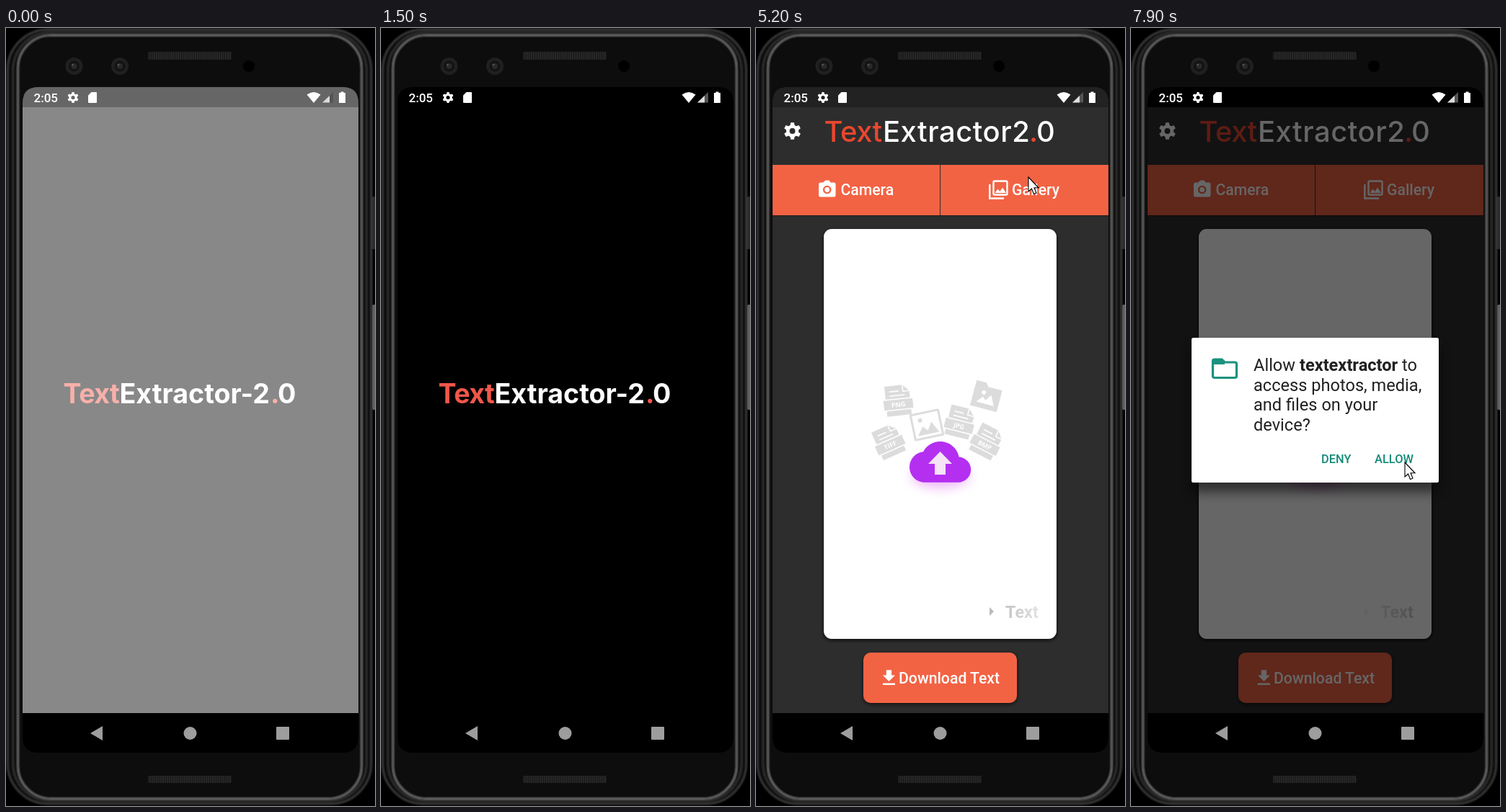
Animation, 512 px wide and 1080 px high, one loop 8 s. Source, as an HTML page:

```html
<!DOCTYPE html>
<html lang="en">
<head>
<meta charset="utf-8">
<title>Text extractor demo</title>
<style>
  html, body { margin: 0; width: 100%; height: 100%; overflow: hidden; background: #000; }
  svg { display: block; width: 100vw; height: 100vh; }
  text { font-family: Roboto, sans-serif; white-space: pre; }
  .title text { font: 500 40px Inter, sans-serif; letter-spacing: .5px; }
  .splash text { font: 700 37.6px Inter, sans-serif; }
  .title .red, .splash .red { letter-spacing: -.5px; }
  .label { font-size: 21.2px; font-weight: 500; fill: #fff; }
  .body { font-size: 23.6px; fill: #212121; }
  .action { font-size: 16.4px; font-weight: 500; fill: #138a77; }
  .tag { font: 700 9px "Open Sans", sans-serif; fill: #fff; text-anchor: middle; }
</style>
</head>
<body>
<svg viewBox="0 0 512 1080">
  <defs>
    <clipPath id="screen"><path d="M23 951V104Q23 82 45 82H467Q489 82 489 104V951Z"/></clipPath>
    <filter id="blur" x="-50%" y="-50%" width="200%" height="200%"><feGaussianBlur stdDeviation="8"/></filter>
    <filter id="soft" x="-10%" y="-10%" width="120%" height="120%"><feGaussianBlur stdDeviation="2"/></filter>
    <filter id="smooth" x="-5%" y="-5%" width="110%" height="110%"><feGaussianBlur stdDeviation=".8"/></filter>
    <pattern id="mesh" width="3" height="3" patternUnits="userSpaceOnUse">
      <rect width="3" height="3" fill="#262626"/><rect width="1" height="3" fill="#191919"/>
    </pattern>
    <linearGradient id="shimmer" gradientUnits="userSpaceOnUse" x1="-100" x2="100" y1="0" y2="0">
      <stop offset="0" stop-color="#bbb"/><stop offset=".5" stop-color="#fafafa"/><stop offset="1" stop-color="#bbb"/>
    </linearGradient>
    <g id="gear">
      <circle r="5.4" fill="none" stroke-width="4" stroke="#fff"/>
      <g id="teeth" fill="#fff"></g>
    </g>
  </defs>

  <g id="phone">
    <rect width="512" height="1080" fill="#000"/>
    <rect x="507" y="234" width="6" height="73" rx="2" fill="#2b2b2b"/>
    <rect x="508" y="384" width="6" height="146" rx="2" fill="#626262"/>
    <g filter="url(#smooth)">
      <rect x="2" y="2" width="505" height="1075" rx="56" fill="#101010" stroke="#3c3c3c" stroke-width="2.400"/>
      <rect x="10" y="6" width="490" height="1067" rx="52" fill="#060606" stroke="#2e2e2e" stroke-width="3"/>
      <rect x="16.500" y="10" width="477" height="1060" rx="46" fill="#080808" stroke="#747474" stroke-width="2.200"/>
    </g>
    <path d="M23 951H489V984Q489 1006 467 1006H45Q23 1006 23 984Z" fill="#000"/>
    <rect x="197" y="33" width="116" height="11" rx="2" fill="url(#mesh)"/>
    <rect x="197" y="1038" width="116" height="10" rx="2" fill="url(#mesh)"/>
    <g id="lenses"></g>
    <circle cx="337" cy="53" r="8" fill="#000"/>
    <g fill="#9d9d9d">
      <path d="M117 979L134 969V989Z"/><circle cx="255.500" cy="979" r="9"/>
      <rect x="375" y="970" width="18" height="18" rx="1"/>
    </g>
  </g>

  <g clip-path="url(#screen)">
    <g id="splash" class="splash">
      <rect x="23" y="82" width="466" height="869" fill="#000"/>
      <text class="red" x="79.500" y="521" fill="#f0574a">Text</text>
      <text x="157.500" y="521" fill="#fff">Extractor-2</text>
      <text x="367" y="521" fill="#f0574a">.</text>
      <text x="377" y="521" fill="#fff">0</text>
      <rect id="flash" x="23" y="110" width="466" height="841" fill="#fff"/>
      <rect id="flashBar" x="23" y="82" width="466" height="28" fill="#fff"/>
    </g>

    <g id="main">
      <rect x="23" y="82" width="466" height="869" fill="#2d2d2d"/>
      <use href="#gear" transform="translate(50.5 143) scale(1.17)"/>
      <g class="title">
        <text class="red" x="94.500" y="157.500" fill="#e9472f">Text</text>
        <text x="176" y="157.500" fill="#fff">Extractor2</text>
        <text x="379" y="157.500" fill="#e9472f">.</text>
        <text x="389" y="157.500" fill="#fff">0</text>
      </g>
      <path d="M23 190H255V260H23ZM256 190H489V260H256Z" fill="#f26344"/>
      <path d="M23 260.500H489" stroke="#1c1c1c"/>
      <path d="M94 213.500 96.500 211.500H101.500L103.500 214.500H108Q110.500 214.500 110.500 217V232Q110.500 234.500 108 234.500H89.500Q87 234.500 87 232V217Q87 214.500 89.500 214.500H93Z" fill="#fff"/>
      <circle cx="98.700" cy="224.500" r="4.600" fill="none" stroke="#f26344" stroke-width="2.400"/>
      <text class="label" x="117.500" y="232">Camera</text>
      <g fill="none" stroke="#fff" stroke-width="2.400">
        <rect x="329.500" y="212.500" width="19" height="19" rx="1.500"/>
        <path d="M324.300 217V236.500H344"/>
      </g>
      <path d="M331.500 229L335.500 223.500L338.500 227L342 221.500L347 229Z" fill="#fff"/>
      <text class="label" x="355" y="232">Gallery</text>

      <rect x="94" y="281" width="323" height="569" rx="11" fill="#111" filter="url(#soft)"/>
      <rect x="94" y="279" width="323" height="569" rx="11" fill="#fff"/>
      <g id="files" fill="#dcdcdc"></g>
      <g id="cloud">
        <ellipse cx="256" cy="622" rx="40" ry="16" fill="#e58bf0" opacity=".65" filter="url(#blur)"/>
        <path transform="translate(213 559.800) scale(3.55)" fill="#b52ff1"
          d="M19.350 10.040C18.670 6.590 15.640 4 12 4 9.110 4 6.600 5.640 5.350 8.040 2.340 8.360 0 10.910 0 14c0 3.310 2.690 6 6 6h13c2.760 0 5-2.240 5-5 0-2.640-2.050-4.780-4.650-4.960z"/>
        <path d="M255.500 588L272 605H263V620H248V605H239Z" fill="#f6e3f6"/>
      </g>
      <g fill="url(#shimmer)">
        <path d="M324 804L330 810L324 816Z"/>
        <text x="346" y="819" font-size="23.400" font-weight="700">Text</text>
      </g>

      <rect x="149" y="869" width="213" height="70" rx="10" fill="#161616" filter="url(#soft)"/>
      <rect x="149" y="867" width="213" height="70" rx="10" fill="#f26344"/>
      <path transform="translate(169.800 887.500) scale(1.22)" fill="#fff" d="M19 9h-4V3H9v6H5l7 7 7-7zM5 18v2h14v-2H5z"/>
      <text class="label" x="198" y="910">Download Text</text>
      <rect id="dim" x="23" y="82" width="466" height="869" fill="#000"/>
      <rect id="bar" x="23" y="82" width="466" height="28"/>
    </g>
  </g>

  <g id="status" fill="#fff">
    <text x="38.500" y="102.500" font-size="17" font-weight="500">2:05</text>
    <use href="#gear" transform="translate(93 96.5) scale(.76)"/>
    <path d="M118.500 89H125Q126 89 126 90V103Q126 104 125 104H115Q114 104 114 103V93.500Z"/>
    <path d="M427 104L417.500 92.500Q427 85.500 436.500 92.500Z"/>
    <path d="M454 89V103.500H439Z" fill="#555"/>
    <path d="M449 94V103.500H439Z" fill="#ddd"/>
    <path d="M464.500 88.500H468.500V90H471V104H462V90H464.500Z"/>
  </g>

  <g id="dialog">
    <rect x="84" y="442" width="343" height="202" rx="3" fill="#000" opacity=".55" filter="url(#blur)"/>
    <rect x="84" y="430" width="343" height="201" rx="2.500" fill="#fff"/>
    <path d="M116 460H126L130 464H144Q146.500 464 146.500 466.500V483Q146.500 485.500 144 485.500H116Q113.500 485.500 113.500 483V462.500Q113.500 460 116 460Z" fill="none" stroke="#1a927e" stroke-width="3.200"/>
    <path d="M114 460H126L130 464V467H114Z" fill="#1a927e"/>
    <text class="body" x="170" y="476">Allow <tspan font-weight="700">textextractor</tspan> to</text>
    <text class="body" x="170" y="503.500">access photos, media,</text>
    <text class="body" x="170" y="531">and files on your</text>
    <text class="body" x="170" y="558.500">device?</text>
    <text class="action" x="264" y="604">DENY</text>
    <text class="action" x="338" y="604">ALLOW</text>
  </g>

  <path id="cursor" d="M0 0V20L4.500 16L7.500 23.500L11 22L8 14.800H14Z" fill="#fff" stroke="#000" stroke-width="1.100"/>
</svg>

<script>
const LOOP = 8000, STEP = 100;
const $ = id => document.getElementById(id);
const set = (id, name, value) => $(id).setAttribute(name, value);
const show = (id, on) => set(id, "visibility", on ? "visible" : "hidden");
const clamp = v => Math.max(0, Math.min(1, v));
const span = (t, from, to) => clamp((t - from) / (to - from));
const ease = p => p * p * (3 - 2 * p);
const mix = (a, b, p) => a + (b - a) * p;

$("teeth").innerHTML = [0, 60, 120, 180, 240, 300].map(a =>
  `<path d="M-2.700 -6.300L-2 -10H2L2.700 -6.300Z" transform="rotate(${a})"/>`).join("");

$("lenses").innerHTML = [94.5, 158].map(x =>
  `<g transform="translate(${x} 53)"><circle r="12" fill="#202020"/><circle r="7.500" fill="#131313"/>
   <circle r="4" fill="#292929"/><circle cx="-2" cy="-2" r="1.500" fill="#505050"/></g>`).join("");

const picture = `<path d="M-15 13L-6 1L0 8L7 -3L15 13Z" fill="#dcdcdc"/><circle cx="-8" cy="-8" r="3"/>`;
const page = name => `<path d="M-17 -21H8L17 -12V21H-17Z"/>
  <path d="M8 -21V-12H17M-11 -13H2M-11 -7H10" fill="none" stroke="#fff" stroke-width="1.600"/>
  <rect x="-21" y="-2" width="42" height="15" rx="1" stroke="#fff" stroke-width="1.500"/>
  <text class="tag" y="9">${name}</text>`;
const frame = `<rect x="-21" y="-19" width="42" height="38" rx="2"/>
  <rect x="-18" y="-16" width="36" height="32" fill="#fff"/>${picture}`;
const folder = `<path d="M-19 -18H-5L-1 -13H19V18H-19Z"/>
  <path d="M-12 11L-5 2L0 6L6 -3L13 11Z" fill="#fff"/><circle cx="-5" cy="-4" r="3" fill="#fff"/>`;

const files = [
  [197, 517, -6, page("PNG")], [184, 574, -24, page("TIFF")], [237, 551, -12, frame],
  [320, 574, 27, page("BMP")], [283, 547, 14, page("JPG")], [320, 511, 15, folder]
];
$("files").innerHTML = files.map(f => `<g>${f[3]}</g>`).join("");

function drawFiles(t) {
  const out = ease(span(t, 3100, 3800)) * (1 - ease(span(t, 5600, 6000)));
  files.forEach(([x, y, turn], i) => {
    const part = $("files").children[i];
    part.setAttribute("transform",
      `translate(${mix(255, x, out)} ${mix(605, y, out)}) rotate(${turn * out}) scale(${out})`);
  });
  const pop = ease(span(t, 3000, 3400));
  set("cloud", "transform", `translate(${255.5 * (1 - pop)} ${603 * (1 - pop)}) scale(${pop})`);
}

function drawCursor(t) {
  show("cursor", t >= 4500);
  const enter = 1 - (1 - span(t, 4400, 5200)) ** 2;
  const p = ease(span(t, 7000, 7700)), q = 1 - p;
  const x = t < 6000 ? mix(481, 378, enter) : q * q * 378 + 2 * q * p * 531 + p * p * 380;
  const y = t < 6000 ? mix(560, 207, enter) : mix(207, 603, p);
  set("cursor", "transform", `translate(${x} ${y})`);
}

function draw(time) {
  const t = Math.floor((time % LOOP) / STEP) * STEP;
  const started = t >= 3000;
  show("splash", !started);
  show("main", started);

  const fade = 1 - span(t, 0, 300);
  set("flash", "opacity", 0.533 * fade ** 1.75);
  set("flashBar", "opacity", 0.4 * fade ** 3.5);

  drawFiles(t);
  const phase = (t - 6000 + 4 * 1500) % 1500 - 400;
  set("shimmer", "gradientTransform", `translate(${320 + phase * 0.367} 0)`);

  const dim = 0.6 * span(t, 6200, 6800);
  const tone = Math.round(34 * (1 - dim / 0.6));
  set("dim", "opacity", dim);
  set("bar", "fill", `rgb(${tone},${tone},${tone})`);
  show("dialog", t >= 6300);
  set("dialog", "opacity", span(t, 6200, 6410));
  drawCursor(t);
}

const start = performance.now();
function tick() {
  draw(performance.now() - start);
  requestAnimationFrame(tick);
}
tick();
</script>
</body>
</html>
```
